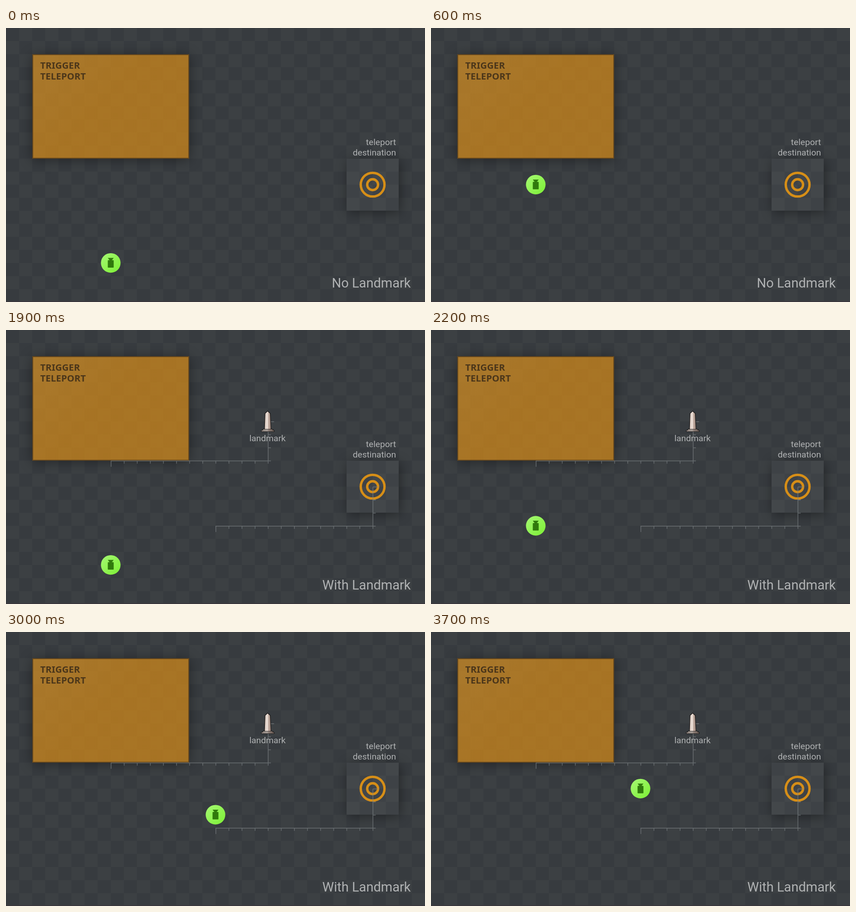
Animation, 924 px wide and 606 px high, one loop 4700 ms. Source, as an HTML page:

```html
<!DOCTYPE html>
<html lang="en">
<head>
<meta charset="utf-8">
<title>Teleport landmark</title>
<style>
  html, body { margin: 0; width: 100%; height: 100%; overflow: hidden; background: #373b3f; }
  #stage { position: relative; width: 924px; height: 606px; overflow: hidden; --cell: 28.875px;
    background: conic-gradient(#373b3f 25%, #3c4043 0 50%, #373b3f 0 75%, #3c4043 0) 28.875px 0 / 57.75px 57.75px; }
  #stage::after { content: ""; position: absolute; inset: auto 0 0; height: 2px; background: #3a373d; }
  .box { position: absolute; box-sizing: border-box; }
  #trigger { left: 57.75px; top: 57.75px; width: 346.5px; height: 231px; border: 2px solid #67481d;
    background: linear-gradient(135deg, rgba(217,146,36,.7), rgba(214,139,24,.7) 45%) border-box;
    box-shadow: 0 3px 26px rgba(0,0,0,.4); }
  #target { left: 750.75px; top: 288.75px; width: 115.5px; height: 115.5px;
    background: rgba(255,255,255,.035); box-shadow: 3px 4px 24px rgba(0,0,0,.4); }
  svg { position: absolute; inset: 0; }
  text { font: 19.2px Roboto, sans-serif; fill: #b0b2b3; }
  .end { text-anchor: end; }
  .mid { text-anchor: middle; }
  text.title { font-size: 29px; }
  text.trigger { font: 700 20.4px "Noto Sans", sans-serif; fill: #4b361a; }
</style>
</head>
<body>
<div id="stage">
  <div id="trigger" class="box"></div>
  <div id="target" class="box"></div>
  <svg width="924" height="606" viewBox="0 0 924 606">
    <defs>
      <linearGradient id="green" x2="1" y2="1">
        <stop offset=".1" stop-color="#a2f76e"/><stop offset=".9" stop-color="#80f03a"/>
      </linearGradient>
      <linearGradient id="stone">
        <stop offset=".1" stop-color="#d5c5bc"/><stop offset=".45" stop-color="#eee2da"/>
        <stop offset=".6" stop-color="#c3aea3"/><stop offset="1" stop-color="#9c857a"/>
      </linearGradient>
    </defs>
    <text class="trigger" x="75.5" y="90">TRIGGER</text>
    <text class="trigger" x="75.5" y="113.7">TELEPORT</text>
    <text class="end" x="860" y="259">teleport</text>
    <text class="end" x="860" y="281.5">destination</text>
    <g fill="none" stroke="#d68e17" stroke-width="5.3">
      <circle cx="808.5" cy="346.5" r="26.2"/>
      <circle cx="808.5" cy="346.5" r="12"/>
    </g>
    <g id="landmark">
      <path id="rulers" fill="none" stroke="#7d8285" stroke-opacity=".7" stroke-width="1.5"/>
      <g fill="url(#stone)" stroke="#151313" stroke-width="1.2" stroke-linejoin="round">
        <path d="M570 219.5 571.3 184.5 577 179.3 582.7 184.5 584.5 219.5Z"/>
        <path d="M566 219.5H588.5V222H566Z M563 222H591.5V224.5H563Z"/>
      </g>
      <text class="mid" x="576.7" y="245.5">landmark</text>
    </g>
    <text id="title" class="title end" x="892.5" y="574"></text>
    <g id="player">
      <circle r="21.65" fill="url(#green)"/>
      <path fill="#307a0c" d="M-6.5-11.2H6.5L2.5-6H5.5Q6.5-6 6.5-5V9.5Q6.5 10.5 5.5 10.5H-5.5Q-6.5 10.5-6.5 9.5V-5Q-6.5-6-5.5-6H-2.5Z"/>
    </g>
  </svg>
</div>
<script>
const CELL = 28.875, LOOP = 4700, SECOND_PART = 1900;
const $ = id => document.getElementById(id);

// Three cells down and twelve to the left, with a tick at every cell.
function ruler(col, row) {
  const x = col * CELL + .7, y = row * CELL + .7;
  const bottom = y + 3 * CELL, left = x - 12 * CELL;
  let d = `M${x} ${y}V${bottom + 6}M${x + 6} ${bottom}H${left}v13M${x} ${y}h13`;
  for (let i = 1; i < 3; i++) d += `M${x} ${y + i * CELL}h6`;
  for (let i = 1; i < 12; i++) d += `M${left + i * CELL} ${bottom}v6`;
  return d;
}

// Player position in cells; steps are tenths of a second.
function playerAt(step, withLandmark) {
  if (step < 9) return [8, Math.max(18 - step, 10.75)];
  if (!withLandmark) return [28, 12];
  const glide = Math.min(step - 9, 9);
  return [16, 11.673 + 4.077 * 0.7555 ** glide];
}

function draw(now) {
  const time = now % LOOP;
  const withLandmark = time >= SECOND_PART;
  const step = Math.floor((withLandmark ? time - SECOND_PART : time) / 100);
  const [col, row] = playerAt(step, withLandmark);
  $("player").setAttribute("transform", `translate(${col * CELL} ${row * CELL - .15})`);
  $("landmark").style.display = withLandmark ? "" : "none";
  $("title").textContent = withLandmark ? "With Landmark" : "No Landmark";
}

$("rulers").setAttribute("d", ruler(20, 7) + ruler(28, 12));
const start = performance.now();
function tick() {
  draw(performance.now() - start);
  requestAnimationFrame(tick);
}
tick();
</script>
</body>
</html>
```
